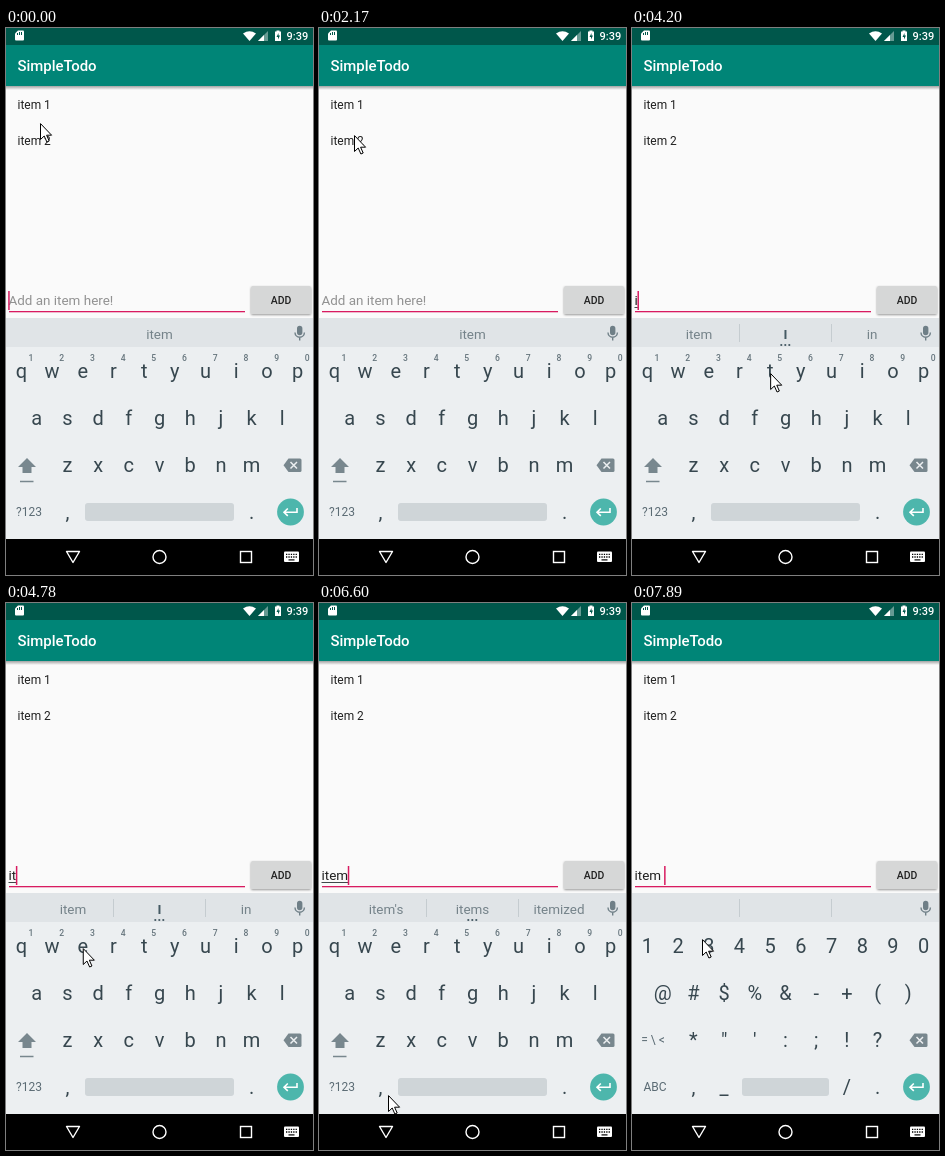
These frames come from a looping animation (307x547 px, 8 s). An HTML page:

```html
<!DOCTYPE html>
<html lang="en">
<head>
<meta charset="utf-8">
<title>SimpleTodo</title>
<style>
  html, body { margin: 0; width: 100%; height: 100%; overflow: hidden; background: #fafafa; }
  svg { display: block; width: 307px; height: 547px; }
  text { font-family: Roboto, "Noto Sans", sans-serif; white-space: pre; }
  .mid { text-anchor: middle; }
  .key { font-size: 20px; fill: #37474f; }
  .hint { font-size: 8.6px; font-weight: 500; fill: #66757d; }
  .mode { font-size: 12px; fill: #5b6b74; }
  .sug { font-size: 13.44px; fill: #75838a; }
  .field { font-size: 13.44px; }
  .item { font-size: 11.95px; fill: #212121; }
</style>
</head>
<body>
<svg viewBox="0 0 307 547">
  <defs>
    <linearGradient id="shade" x2="0" y2="1">
      <stop stop-color="#000" stop-opacity=".35"/>
      <stop offset="1" stop-color="#000" stop-opacity="0"/>
    </linearGradient>
    <filter id="lift" x="-20%" y="-20%" width="140%" height="140%">
      <feDropShadow dx="0" dy="1" stdDeviation=".9" flood-opacity=".4"/>
    </filter>
  </defs>

  <rect width="307" height="547" fill="#fafafa"/>
  <rect width="307" height="58" fill="#008577"/>
  <rect width="307" height="17" fill="#00574b"/>
  <rect y="58" width="307" height="4" fill="url(#shade)"/>

  <!-- status bar -->
  <g fill="#fff">
    <path d="M12 2.500h5q1 0 1 1v8q0 1-1 1h-7q-1 0-1-1v-6z"/>
    <path d="M11.500 5v2m2-3v3m2-3v3" stroke="#00574b"/>
    <path d="M237 5.500q6.500-4.500 13 0l-6.500 7.500z"/>
    <path d="M262 3v10h-10z" opacity=".4"/>
    <path d="M258 7v6h-6z"/>
    <path d="M270.500 3.500v-1h3v1h1.500v9.500h-6v-9.500z"/>
    <path d="M272.500 5l-2 4h1.500v2.500l2-4h-1.500z" fill="#00574b"/>
    <text x="280.500" y="12" font-size="11" font-weight="500">9:39</text>
  </g>

  <text x="11.500" y="43" font-size="14.950" font-weight="500" fill="#fff">SimpleTodo</text>
  <text class="item" x="11.500" y="81">item 1</text>
  <text class="item" x="11.500" y="117">item 2</text>

  <!-- entry row -->
  <text id="place" class="field" x="2.500" y="277" fill="#929292">Add an item here!</text>
  <text id="typed" class="field" x="2.500" y="277" fill="#212121"></text>
  <rect id="under" x="2.500" y="279" height="1" fill="#40484a"/>
  <rect x="3" y="283" width="236" height="1.300" fill="#d81b60"/>
  <rect id="caret" y="263" width="1.500" height="19" fill="#d81b60"/>
  <rect x="245" y="258" width="60" height="28" rx="1.500" fill="#d6d7d7" filter="url(#lift)"/>
  <text class="mid" x="275" y="275.500" font-size="10.460" font-weight="500" fill="#212121">ADD</text>

  <!-- keyboard -->
  <rect y="290" width="307" height="29" fill="#e0e4e7"/>
  <rect y="319" width="307" height="192" fill="#eceff1"/>
  <path id="bars" d="M107.500 296v18m92-18v18" stroke="#c5ccd0"/>
  <g id="sugs"></g>
  <path id="dots" d="M149.300 317h8.100" stroke="#455a64" stroke-width="2.200" stroke-linecap="round" stroke-dasharray="0 4"/>
  <g stroke="#6f7f87" fill="none" stroke-width="1.400">
    <rect x="291.700" y="298.500" width="4" height="8" rx="2" fill="#6f7f87"/>
    <path d="M289 304.500a4.700 4.700 0 0 0 9.400 0m-4.700 4.500v3.500"/>
  </g>
  <g id="letters">
    <rect x="79" y="475" width="149" height="18" rx="3" fill="#cfd5d8"/>
    <path d="M21 430l9 9h-4.500v6h-9v-6h-4.500zm-7 22.700h13.500v1.500h-13.500z" fill="#78878e"/>
  </g>
  <g id="symbols">
    <rect x="110" y="475" width="87" height="18" rx="3" fill="#cfd5d8"/>
  </g>
  <path d="M282.500 430.500h11.500q1.500 0 1.500 1.500v10.500q0 1.500-1.500 1.500h-11.500l-5-6.750z" fill="#78878e"/>
  <path d="M284.500 434l6.500 6.500m0-6.500l-6.500 6.500" stroke="#eceff1" stroke-width="1.500"/>
  <circle cx="284.500" cy="484" r="13.400" fill="#4db6ac"/>
  <path d="M291 480v4.200h-13m3.800-3.700l-3.800 3.700 3.800 3.700" fill="none" stroke="#fff" stroke-width="1.600"/>

  <!-- navigation bar -->
  <rect y="511" width="307" height="36"/>
  <g fill="none" stroke="#fff" stroke-width="1.400">
    <path d="M60.500 523.500h13l-6.500 11z" stroke-linejoin="round"/>
    <circle cx="153.500" cy="529" r="6.500"/>
    <rect x="234.500" y="523.500" width="11" height="11"/>
  </g>
  <rect x="278" y="523.500" width="15" height="10.500" rx="1" fill="#fff"/>
  <path d="M280 526.300h11m-11 2.700h11" stroke="#000" stroke-width="1.300" stroke-dasharray="1.300 1.100"/>
  <path d="M282.500 531.900h6" stroke="#000" stroke-width="1.200"/>

  <g id="popup">
    <rect x="-18.500" y="-71" width="37" height="85" rx="2" fill="#cfd5d8" filter="url(#lift)"/>
    <text id="big" class="mid" y="-39.500" font-size="28" fill="#37474f"></text>
    <text id="more" class="mid" x="12" y="-31" font-size="11" fill="#78878e">...</text>
  </g>
  <path id="mouse" d="M.5.600v15.900l3.700-3.500 2.700 6 2.300-1-2.600-5.800h5z" fill="#fff" stroke="#000" stroke-linejoin="round"/>
</svg>

<script>
const $ = id => document.getElementById(id);
const LOOP = 8000, PITCH = 30.7, ROW = 47, TOP = 343;
const LAG = 120, HOLD = 270, BLINK = 500;

function label(group, str, x, y, cls) {
  const el = document.createElementNS('http://www.w3.org/2000/svg', 'text');
  el.setAttribute('class', cls + ' mid');
  el.setAttribute('x', x);
  el.setAttribute('y', y);
  el.textContent = str;
  return $(group).appendChild(el);
}

// rows start at a column counted in key widths
const spot = {};
function keys(group, chars, col, row) {
  [...chars].forEach((c, i) => {
    const x = (col + i + .5) * PITCH, y = TOP + row * ROW;
    spot[c] = [x, y];
    label(group, c, x, y + 7, 'key');
  });
}

['qwertyuiop', 'asdfghjkl', 'zxcvbnm'].forEach((r, i) => keys('letters', r, i * (i + 1) / 4, i));
['1234567890', '@#$%&-+()', '*"\':;!?'].forEach((r, i) => keys('symbols', r, i * (i + 1) / 4, i));
keys('letters', ',', 1.5, 3);
keys('letters', '.', 7.5, 3);
keys('symbols', ',_', 1.5, 3);
keys('symbols', '/.', 6.5, 3);
[...'1234567890'].forEach((c, i) => label('letters', c, 25 + i * PITCH, 332.5, 'hint'));
label('letters', '?123', 23, 488, 'mode');
label('symbols', '= \\ <', 21, 441, 'mode');
label('symbols', 'ABC', 23, 488, 'mode');
const sugs = [67, 153.5, 240].map(x => label('sugs', '', x, 310.5, 'sug'));

const words = {
  '': ['', 'item', ''],
  i: ['item', 'I', 'in'],
  ite: ['ite', 'item', 'of'],
  item: ["item's", 'items', 'itemized'],
  'item ': ['', '', '']
};
words.it = words.i;

// key, time the pointer arrives, time of the press
const taps = [['i', 3440, 3810], ['t', 4200, 4510], ['e', 4780, 5260], ['m', 5740, 6110], [' ', 6600, 6600]];
const SYMBOLS = 7290;

// resting points of the pointer: x, y, arrive, leave
const stops = [
  [34, 95, 0, 0], [39, 85, 550, 1050], [41, 88, 1290, 1570], [35, 107, 2020, 2170], [97, 275, 2440, 2590],
  [261, 441, 5500, 5500], [69, 492, 6600, 6600], [18, 487, 6990, SYMBOLS - LAG], [70, 336, 7890, LOOP],
  ...taps.filter(([c]) => spot[c]).map(([c, a, p]) => [spot[c][0], spot[c][1] + 2, a, p + LAG])
].sort((a, b) => a[2] - b[2]);

const ease = u => u * u * (3 - 2 * u);

// the pointer advances in jumps of about LAG ms
function pointer(t) {
  const i = stops.findLastIndex(s => s[2] <= t);
  const [x, y, , leave] = stops[i], next = stops[i + 1];
  if (!next || t < leave) return [x, y];
  const span = next[2] - leave, n = Math.max(1, Math.round(span / LAG));
  const u = ease(Math.floor((t - leave) / span * n) / n);
  return [x + (next[0] - x) * u, y + (next[1] - y) * u];
}

const textAt = t => taps.filter(k => k[2] + LAG <= t).map(k => k[0]).join('');

function caretOn(t) {
  const edit = taps.findLast(k => k[2] + LAG <= t);
  const since = edit ? t - edit[2] - LAG : t + 450;
  return since % (2 * BLINK) < BLINK;
}

// advance widths of the typed letters
const adv = { i: 3.27, t: 4.4, e: 7.12, m: 11.78, ' ': 3.33 };
const show = (id, on) => $(id).style.display = on ? '' : 'none';
const move = (id, [x, y]) => $(id).setAttribute('transform', `translate(${x} ${y})`);

function draw(t) {
  const text = textAt(t), hints = textAt(t - LAG);
  const w = [...text].reduce((sum, c) => sum + adv[c], 0);
  $('typed').textContent = text;
  $('caret').setAttribute('x', 2.2 + w);
  $('under').setAttribute('width', w);
  show('place', !text);
  show('caret', caretOn(t));
  show('under', !text.endsWith(' '));
  show('bars', hints);
  show('dots', hints && !hints.endsWith(' '));
  show('letters', t < SYMBOLS);
  show('symbols', t >= SYMBOLS);

  sugs.forEach((el, i) => el.textContent = words[hints][i]);
  const exact = words[hints][1] === 'I';
  sugs[1].style.fontWeight = exact ? 700 : 400;
  sugs[1].style.fill = exact ? '#455a64' : '';

  const tap = taps.find(([c, , p]) => spot[c] && t >= p && t < p + HOLD);
  show('popup', tap);
  if (tap) {
    move('popup', spot[tap[0]]);
    $('big').textContent = tap[0];
    show('more', spot[tap[0]][1] === TOP);
  }
  move('mouse', pointer(t));
}

const start = performance.now();
function tick() {
  draw((performance.now() - start) % LOOP);
  requestAnimationFrame(tick);
}
tick();
</script>
</body>
</html>
```
